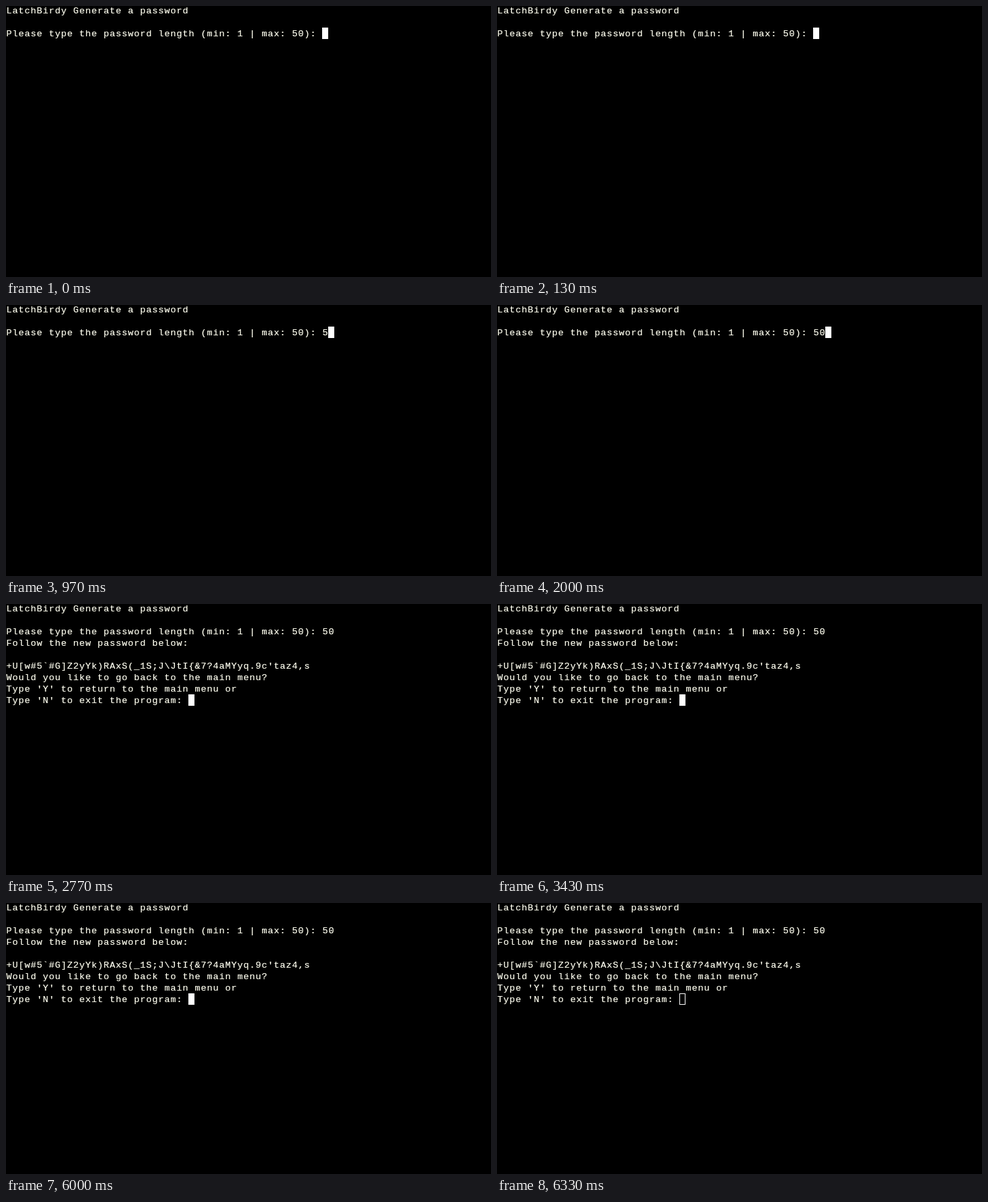
These frames come from a looping animation (718x402 px, 6.43 s). An HTML page:

```html
<!DOCTYPE html>
<html lang="en">
<head>
<meta charset="utf-8">
<title>Terminal session</title>
<style>
  html, body { margin: 0; width: 100%; height: 100%; overflow: hidden; background: #000; }
  svg { display: block; width: 718px; height: 402px; background: #000; }
  text {
    font: 13.5px "Liberation Mono", monospace;
    letter-spacing: 0.9px;
    fill: #fffff0;
    stroke: #fffff0;
    stroke-width: 0.2px;
    white-space: pre;
  }
</style>
</head>
<body>
<svg id="screen" viewBox="0 0 718 402"></svg>
<script>
const LOOP = 6430;
const CELL = 9;
const ROW = 17;
const TYPED = [[700, "5"], [1370, "0"]];
const REPLY_AT = 2770;
const BLUR_AT = 6330;

const HEAD = ["LatchBirdy Generate a password", ""];
const PROMPT = "Please type the password length (min: 1 | max: 50): ";
const REPLY = [
  "Follow the new password below:",
  "",
  "+U[w#5`#G]Z2yYk)RAxS(_1S;J\\JtI{&7?4aMYyq.9c'taz4,s",
  "Would you like to go back to the main menu?",
  "Type 'Y' to return to the main menu or",
  "Type 'N' to exit the program: "
];

const screen = document.getElementById("screen");

function add(name, attrs) {
  const node = document.createElementNS("http://www.w3.org/2000/svg", name);
  for (const key in attrs) node.setAttribute(key, attrs[key]);
  return screen.appendChild(node);
}

const rowCount = HEAD.length + 1 + REPLY.length;
const rows = Array.from({ length: rowCount }, (_, i) => add("text", { x: 0.45, y: i * ROW + 11 }));
const cursor = add("rect", { width: CELL - 1, height: ROW - 1, stroke: "#fff", "stroke-width": 1 });

function linesAt(t) {
  const typed = TYPED.filter(([at]) => t >= at).map(([, key]) => key).join("");
  return [...HEAD, PROMPT + typed, ...(t >= REPLY_AT ? REPLY : [])];
}

function draw(t) {
  const lines = linesAt(t);
  rows.forEach((row, i) => {
    const line = lines[i] || "";
    if (row.textContent !== line) row.textContent = line;
  });
  const last = lines.length - 1;
  cursor.setAttribute("x", lines[last].length * CELL + 0.5);
  cursor.setAttribute("y", last * ROW - 1.5);
  cursor.setAttribute("fill", t >= BLUR_AT ? "none" : "#fff");
}

const start = performance.now();
function tick() {
  draw((performance.now() - start) % LOOP);
  requestAnimationFrame(tick);
}
draw(0);
requestAnimationFrame(tick);
</script>
</body>
</html>
```
